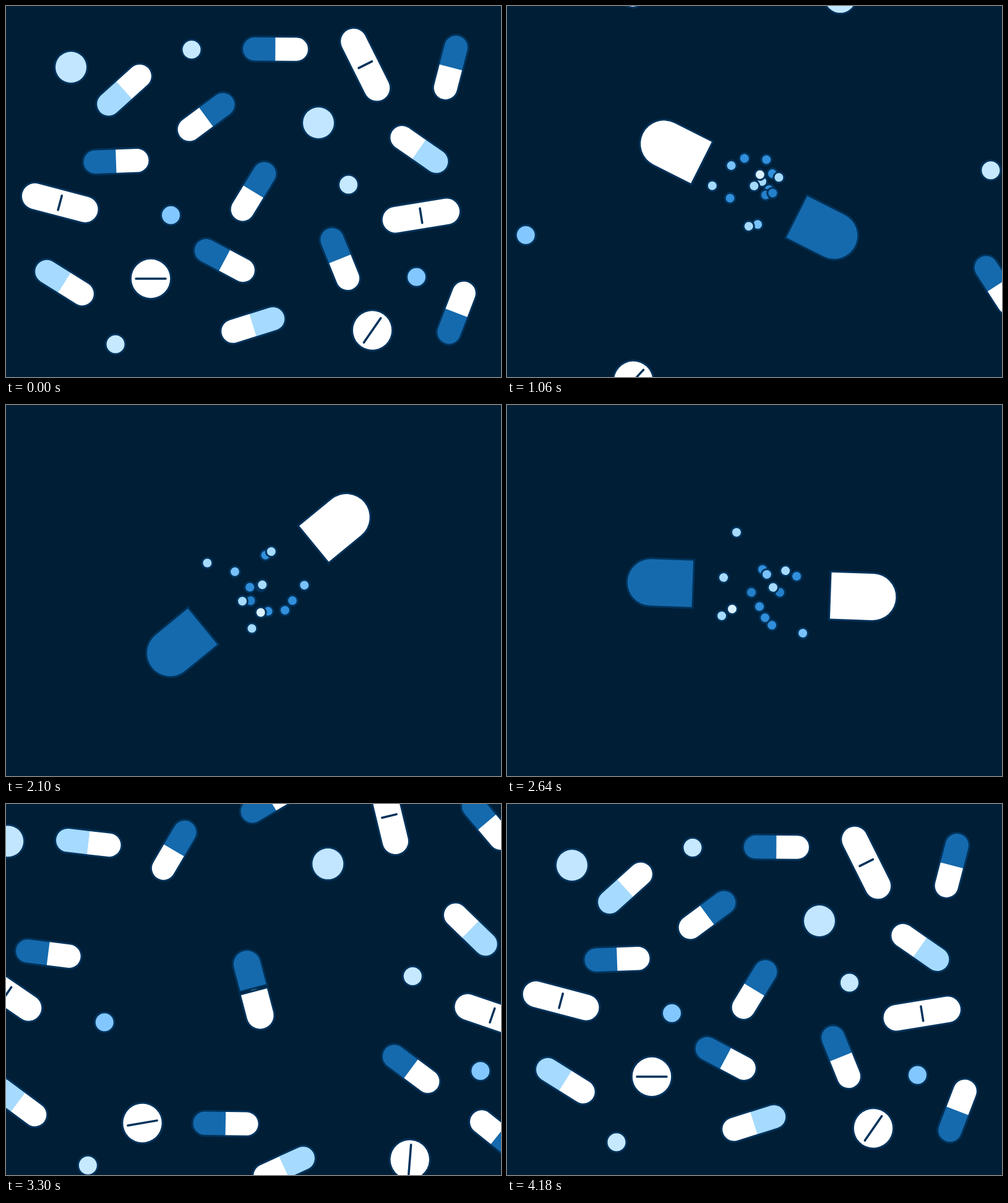
Write an HTML page with a canvas that moves like this. It is 800 by 600 pixels and loops after 4320 ms.

```html
<!DOCTYPE html>
<html lang="en">
<head>
<meta charset="utf-8">
<title>Pills</title>
<style>
html, body { margin: 0; height: 100%; overflow: hidden; background: #001e36; }
canvas { display: block; }
</style>
</head>
<body>
<canvas id="stage" width="800" height="600"></canvas>
<script>
const ctx = document.getElementById('stage').getContext('2d');
const LOOP = 4320, START = 220, END = 4180;
const BG = '#001e36', EDGE = '#00325a', WHITE = '#fff', BLUE = '#156aad', SKY = '#a6dbff';
const PALE = '#c2e6ff', MID = '#82c7ff';

// Drifting pieces end with: dx, dy, turn out, turn back (per unit of spread).
// Capsules: first colour, second colour, x, y, angle
const capsules = [
  [SKY, WHITE, 191, 136, -42, -29.5, -37.5, 10.3, 24.8],
  [WHITE, BLUE, 323.5, 179.5, -36.5, -26.5, -53.5, -10, -11.8],
  [BLUE, WHITE, 435.5, 69.7, 0.3, -4.2, -38.5, -19.6, -15.8],
  [BLUE, WHITE, 718.8, 99.5, 104.5, 30, -35.7, -12.8, -28],
  [WHITE, SKY, 667.8, 232, 34.8, 42.4, -14.8, 6, 4.75],
  [BLUE, WHITE, 539.7, 409.2, 68, 58.7, 9.8, -2.5, -16],
  [BLUE, WHITE, 728, 496, -69, 34.3, 20, -9.3, -37],
  [WHITE, SKY, 399.2, 516, -17.3, 25.7, 36.3, 9.6, -3.8],
  [BLUE, WHITE, 353.3, 411.5, 28.1, 0.9, 53.8, -11.7, -13.9],
  [SKY, WHITE, 94.5, 447.5, 32.2, -38.3, 17.8, 9.8, 2.3],
  [BLUE, WHITE, 178, 251, -2, -56, -4.6, 19.5, 4.7]
];
// Scored tablets: half length, radius, score angle, score half length, x, y, angle
const tablets = [
  [62.75, 20.75, 90, 12, 580.7, 95, 63.5, 19.8, -38.6, 11, 6.6],
  [62.75, 20.75, 90, 12, 670.8, 339, -9.2, 58.8, 1.5, 12.8, 14.4],
  [62.75, 20.75, 90, 12, 87.2, 318.3, 14.8, -43.6, -6.2, 14.7, 10],
  [31.2, 31.2, 0, 24, 592, 524.5, -55.3, 31, 25.8, -14.7, -15.4],
  [31.2, 31.2, 0, 24, 234, 441, 0, -6.9, 38.3, -11, -5]
];
// Plain discs: colour, radius, x, y, dx, dy, optional dx on the way back
const discs = [
  [PALE, 25, 105, 99, -42.5, -19.8, -52],
  [PALE, 25, 505, 189, 7.8, -47.1],
  ['#c6e9ff', 14.5, 300, 70.5, -2.8, -48.9],
  ['#c6e9ff', 14.5, 553.5, 289, 53, -5.4],
  ['#c6e9ff', 14.5, 177, 547, -22.8, 19.2],
  [MID, 14.5, 266.5, 338.3, -54.8, 7.5],
  [MID, 14.5, 663.5, 438.3, 52.8, -3.3]
];
// Grains: colour, then place along and across the capsule when leaving, spread and late
const DEEP = '#2580ca', BRIGHT = '#318fdc', LIGHT = '#78c1fb', FROST = '#daf1ff';
const grains = [
  [BRIGHT, -16.3, -12.2, -46.2, -50.3, -30, -55],
  [BRIGHT, -13.5, -4.2, -36.2, 38.2, -67.2, 25.4],
  [BRIGHT, 34, -10, -19.6, -70, -18.5, -43.4],
  [BRIGHT, 7.3, 10.2, 14.7, -55.5, -8.9, -25.7],
  [BRIGHT, 38, 0, 13.7, -18, -11.8, 34.5],
  [DEEP, 36, -4, 12.7, -2.7, -41, -1.6],
  [DEEP, 40, 4, 23, -16.2, 4.9, -3.2],
  [LIGHT, -36, -6, -57.9, -25.5, -80.4, -66.3],
  [LIGHT, 36, 8, 26, 58, -19, 26.7],
  [SKY, -36, 8, -75, 27.3, -48.9, 33.7],
  [SKY, 14.1, -13.2, 0, -22.2, 50.7, 19.2],
  [SKY, -5.4, -2.6, -4.3, -9.5, -29.8, 6],
  [SKY, 7.9, -7.3, 30.8, -48.6, 51.5, -42.8],
  [SKY, -11.5, 5.6, 26.8, 71, 32.3, 93],
  [FROST, 4, 0.8, -7.2, -38.4, 35, -31.2]
];
// Turn of the middle capsule: time, degrees, degrees per ms
const turns = [
  [220, 0, 0], [700, 33, .14], [1300, 120, .14], [1580, 156.3, .11], [1830, 179.3, .08],
  [2360, 218, .077], [2640, 240.6, .078], [2900, 260.6, .075], [3300, 313.9, .2226]
];

const rad = deg => deg * Math.PI / 180;
const clamp = x => Math.max(0, Math.min(1, x));
const mix = (a, b, k) => a + (b - a) * k;

function ease(t, from, to) {
  const s = clamp((t - from) / (to - from));
  return s < .5 ? 4 * s ** 3 : 1 - 4 * (1 - s) ** 3;
}

function turnAt(t) {
  if (t >= 3300) return 360 - 11.9 * ((END - t) / 640) ** 4.25;
  let i = 0;
  while (i < turns.length - 2 && t > turns[i + 1][0]) i++;
  const [t0, a, m0] = turns[i], [t1, b, m1] = turns[i + 1];
  const h = t1 - t0, s = (t - t0) / h, r = 1 - s;
  return a * (1 + 2 * s) * r * r + b * s * s * (3 - 2 * s) + h * s * r * (m0 * r - m1 * s);
}

function at(x, y, deg, draw) {
  ctx.save();
  ctx.translate(x, y);
  ctx.rotate(rad(deg));
  draw();
  ctx.restore();
}

function outline(path) {
  ctx.strokeStyle = EDGE;
  ctx.lineWidth = 6;
  ctx.stroke(path);
}

function fill(path, color) {
  ctx.fillStyle = color;
  ctx.fill(path);
}

function halfPath(x, y, dir, k) {
  const r = 18.75 * k, p = new Path2D(), cap = x + dir * 33.75 * k;
  p.moveTo(x - dir * .2, y - r);
  p.lineTo(cap, y - r);
  p.arc(cap, y, r, -Math.PI / 2, Math.PI / 2, dir < 0);
  p.lineTo(x - dir * .2, y + r);
  p.closePath();
  return p;
}

function halves(first, second, k = 1, a = [0, 0], b = [0, 0]) {
  const left = halfPath(...a, -1, k), right = halfPath(...b, 1, k);
  outline(left);
  outline(right);
  fill(left, first);
  fill(right, second);
}

function disc(x, y, r, color) {
  const p = new Path2D();
  p.arc(x, y, r, 0, 2 * Math.PI);
  outline(p);
  fill(p, color);
}

function tablet(half, r, scoreAngle, score) {
  const p = new Path2D();
  p.roundRect(-half, -r, 2 * half, 2 * r, r);
  outline(p);
  fill(p, WHITE);
  ctx.rotate(rad(scoreAngle));
  ctx.lineWidth = 3.5;
  ctx.lineCap = 'round';
  ctx.beginPath();
  ctx.moveTo(-score, 0);
  ctx.lineTo(score, 0);
  ctx.stroke();
}

function drawField(spread, back) {
  const place = ([x, y, angle, dx, dy, out, home], draw) =>
    at(x + dx * spread, y + dy * spread, angle + (back ? home : out) * spread, draw);
  for (const [first, second, ...pose] of capsules) place(pose, () => halves(first, second));
  for (const [half, r, angle, score, ...pose] of tablets) place(pose, () => tablet(half, r, angle, score));
  for (const [color, r, x, y, dx, dy, home = dx] of discs)
    disc(x + (back ? home : dx) * spread, y + dy * spread, r, color);
}

const open = t => ease(t, START, 1560);
const LEAVE = open(700);

function drawCentre(t) {
  const close = 1 - ease(t, 2900, 3402);
  const gap = open(t) * close;
  const size = 1 + ease(t, START, 1077) - ease(t, 2900, 3506);
  const grow = Math.min(1, open(t) / LEAVE) * close;
  const burst = clamp((open(t) - LEAVE) / (1 - LEAVE));
  const drift = Math.max(0, t - 1580) / 1060;
  at(400, 300, turnAt(t) - 58.6, () => {
    ctx.globalAlpha = clamp((3310 - t) / 110) * clamp((t - START) / 200);
    if (gap > 0) for (const [color, x0, y0, x1, y1, x2, y2] of grains) {
      const x = mix(x0, x1, burst) + (x2 - x1) * drift;
      const y = mix(y0, y1, burst) + (y2 - y1) * drift;
      disc(x * grow, y * grow, 3.5 * size, color);
    }
    ctx.globalAlpha = 1;
    halves(WHITE, BLUE, size, [-123.7 * gap, -3.8 * gap], [100.7 * gap, 7.3 * gap]);
  });
}

function draw(now) {
  const step = Math.floor(now % LOOP / 20) * 20;
  const t = Math.max(START, Math.min(END, step));
  ctx.fillStyle = BG;
  ctx.fillRect(0, 0, 800, 600);
  if (t < 1560) drawField(open(t) / LEAVE, false);
  else if (t > 2900) drawField(.8 * ((END - t) / 640) ** 2.81, true);
  drawCentre(t);
}

const begin = performance.now();
function tick() {
  draw(performance.now() - begin);
  requestAnimationFrame(tick);
}
tick();
</script>
</body>
</html>
```
